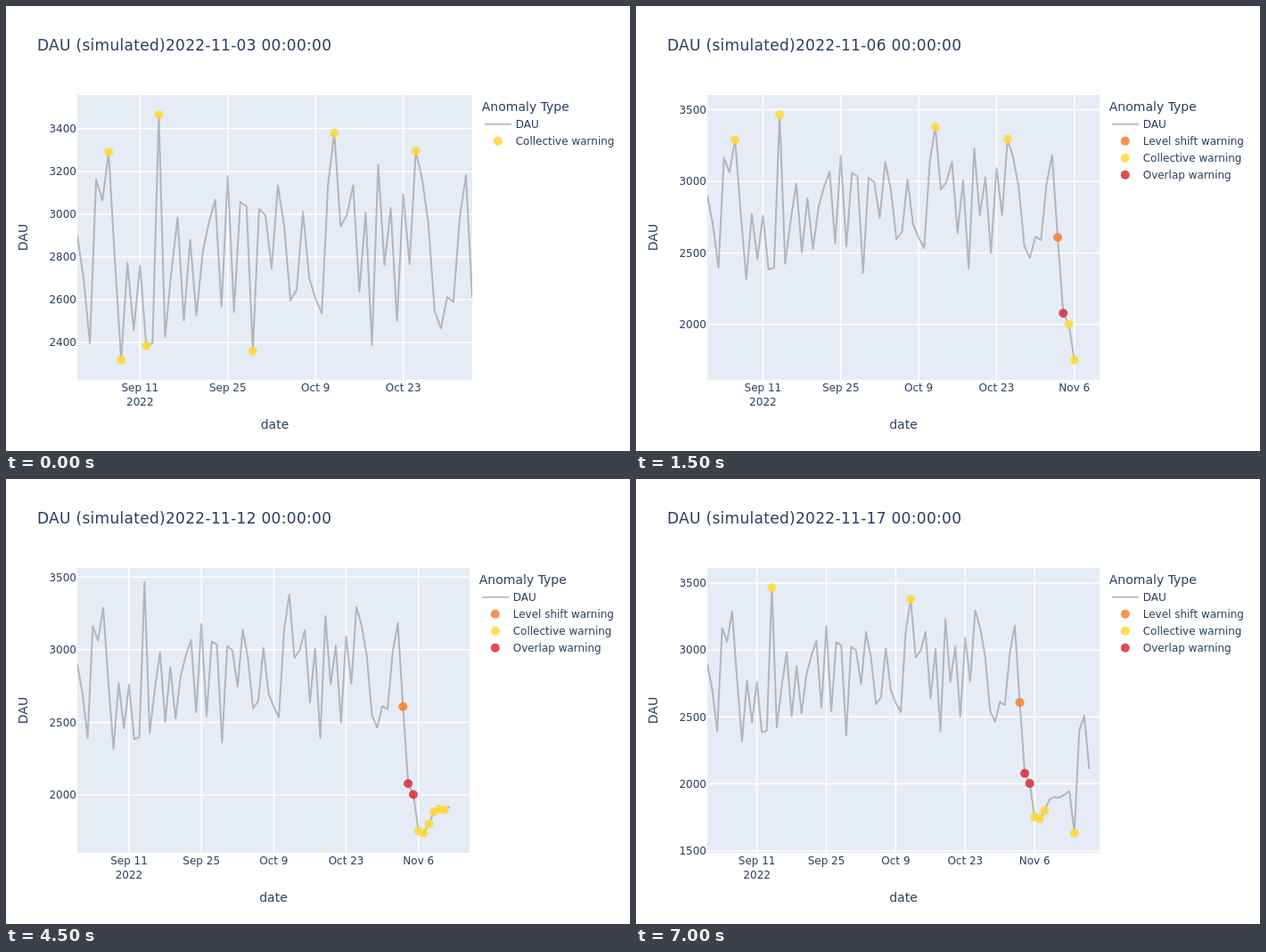
These frames come from a looping animation (700 px wide and 500 px high, 7.5 s). An HTML page:

```html
<!DOCTYPE html>
<html lang="en">
<head>
<meta charset="utf-8">
<title>DAU anomalies</title>
<style>
  html, body { margin: 0; width: 100%; height: 100%; overflow: hidden; background: #fff; }
  svg { display: block; }
  text { font: 12px "DejaVu Sans", Verdana, sans-serif; fill: #2a3f5f; white-space: pre; }
  .title { font-size: 17px; letter-spacing: .3px; }
  .label { font-size: 14px; }
  .grid { stroke: #fff; stroke-width: 1.5; }
  .series { fill: none; stroke: rgba(128, 128, 128, .5); stroke-width: 2; stroke-linejoin: round; }
</style>
</head>
<body>
<svg id="chart" width="700" height="500" viewBox="0 0 700 500"></svg>
<script>
const STEP_MS = 500;
const LEFT = 80, TOP = 100, HEIGHT = 320, BOTTOM = TOP + HEIGHT;
const RADIUS = 5, MARK_PAD = 6.25, EDGE = 0.05;

// Daily values from 1 September
const values = [
  2900, 2700, 2396, 3163, 3063, 3290, 2780, 2318, 2772, 2458, 2760, 2385, 2397,
  3465, 2425, 2730, 2983, 2504, 2880, 2527, 2820, 2962, 3067, 2568, 3179, 2543,
  3058, 3036, 2360, 3025, 2996, 2746, 3135, 2944, 2596, 2646, 3012, 2700, 2606,
  2536, 3138, 3380, 2944, 2996, 3135, 2638, 3007, 2390, 3232, 2762, 3029, 2500,
  3092, 2766, 3295, 3166, 2958, 2548, 2465, 2612, 2590, 2980, 3183, 2608, 2078,
  2003, 1752, 1738, 1800, 1884, 1902, 1897, 1920, 1945, 1633, 2400, 2510, 2110
];
const FIRST_DAY = 63, SHIFT_DAY = 63, DROP_DAY = 64;

const days = (from, to) => Array.from({ length: to - from + 1 }, (_, i) => from + i);
const dropTo = to => days(DROP_DAY, to);
const plateau = dropTo(71);
const second = [...dropTo(69), 71, 74];

// Each step: collective anomalies, number of level shift days
const steps = [
  [[5, 7, 11, 13, 28, 41, 54], 0],
  [[5, 7, 13, 41, 48, 54, 64], 0],
  [[5, 13, 41, 48, 54, ...dropTo(65)], 1],
  [[5, 13, 41, 54, ...dropTo(66)], 2],
  [[13, 41, 54, ...dropTo(67)], 0],
  [[13, 41, ...dropTo(68)], 3],
  [[13, ...dropTo(69)], 3],
  [dropTo(70), 3],
  [plateau, 3],
  [plateau, 3],
  [plateau, 3],
  [second, 3],
  [second, 3],
  [second, 0],
  [[13, 41, ...dropTo(68), 74], 3]
];

const kinds = [
  { name: "Level shift warning", color: "rgba(247,127,45,.85)" },
  { name: "Collective warning", color: "rgba(255,215,60,.85)" },
  { name: "Overlap warning", color: "rgba(217,44,58,.85)" }
];

const text = (x, y, str, anchor = "start", cls = "", extra = "") =>
  `<text x="${x}" y="${y}" text-anchor="${anchor}" class="${cls}" ${extra}>${str}</text>`;
const line = (x1, y1, x2, y2, cls) =>
  `<line x1="${x1}" y1="${y1}" x2="${x2}" y2="${y2}" class="${cls}"/>`;
const dot = (x, y, color) =>
  `<circle cx="${x}" cy="${y}" r="${RADIUS}" fill="${color}"/>`;

function tickSize(rough) {
  const base = 10 ** Math.floor(Math.log10(rough));
  return base * [1, 2, 5, 10].find(m => m * base >= rough);
}

function dayName(day) {
  const inOctober = day >= 30, inNovember = day >= 61;
  if (inNovember) return `Nov ${day - 60}`;
  return inOctober ? `Oct ${day - 29}` : `Sep ${day + 1}`;
}

function legend(right, used) {
  let out = text(right + 10.8, 118, "Anomaly Type", "start", "label");
  out += line(right + 14, 132.8, right + 44, 132.8, "series");
  out += text(right + 48.7, 137, "DAU");
  used.forEach((kind, i) => {
    const y = 152 + i * 19;
    out += dot(right + 28.8, y - .2, kind.color) + text(right + 48.7, y + 4, kind.name);
  });
  return out;
}

function draw(index) {
  const [collective, shiftCount] = steps[index];
  const last = FIRST_DAY + index;
  const shifts = days(SHIFT_DAY, SHIFT_DAY + shiftCount - 1);
  const marked = [...new Set([...shifts, ...collective])];
  const kindOf = d => kinds[!shifts.includes(d) ? 1 : collective.includes(d) ? 2 : 0];
  const used = kinds.filter(k => marked.some(d => kindOf(d) === k));

  const width = shiftCount ? 440 : 443, right = LEFT + width, middle = LEFT + width / 2;
  const perDay = Math.min(width / last, (width * (1 - EDGE) - MARK_PAD) / Math.max(...marked));
  const shown = values.slice(0, last + 1);
  const high = Math.max(...shown), low = Math.min(...shown);
  const pad = v => HEIGHT * EDGE + (marked.includes(shown.indexOf(v)) ? MARK_PAD : 0);
  const scale = (HEIGHT - pad(high) - pad(low)) / (high - low);
  const X = d => LEFT + d * perDay;
  const Y = v => TOP + pad(high) + (high - v) * scale;

  let grid = "", labels = "";
  for (let d = 10; X(d) <= right; d += 14) {
    grid += line(X(d), TOP, X(d), BOTTOM, "grid");
    labels += text(X(d), 433, dayName(d), "middle");
  }
  labels += text(X(10), 449, "2022", "middle");

  const size = tickSize(HEIGHT / scale / 9);
  const floor = low - pad(low) / scale;
  for (let v = Math.ceil(floor / size) * size; Y(v) >= TOP; v += size) {
    grid += line(LEFT, Y(v), right, Y(v), "grid");
    labels += text(79, Y(v) + 4.3, v, "end");
  }

  const path = shown.map((v, d) => `${X(d)},${Y(v)}`).join(" ");
  const date = String(index + 3).padStart(2, "0");
  return `<clipPath id="area"><rect x="${LEFT}" y="${TOP}" width="${width}" height="${HEIGHT}"/></clipPath>
    <rect x="${LEFT}" y="${TOP}" width="${width}" height="${HEIGHT}" fill="#e5ecf6"/>
    <g clip-path="url(#area)">${grid}<polyline class="series" points="${path}"/></g>`
    + marked.map(d => dot(X(d), Y(values[d]), kindOf(d).color)).join("")
    + labels + legend(right, used)
    + text(35, 50, `DAU (simulated)2022-11-${date} 00:00:00`, "start", "title")
    + text(middle, 475, "date", "middle", "label")
    + text(24, 260, "DAU", "middle", "label", 'transform="rotate(-90 24 260)"');
}

const chart = document.getElementById("chart");
let current = -1;
function tick() {
  const index = Math.floor(performance.now() / STEP_MS) % steps.length;
  if (index !== current) {
    current = index;
    chart.innerHTML = draw(index);
  }
  requestAnimationFrame(tick);
}
tick();
</script>
</body>
</html>
```
